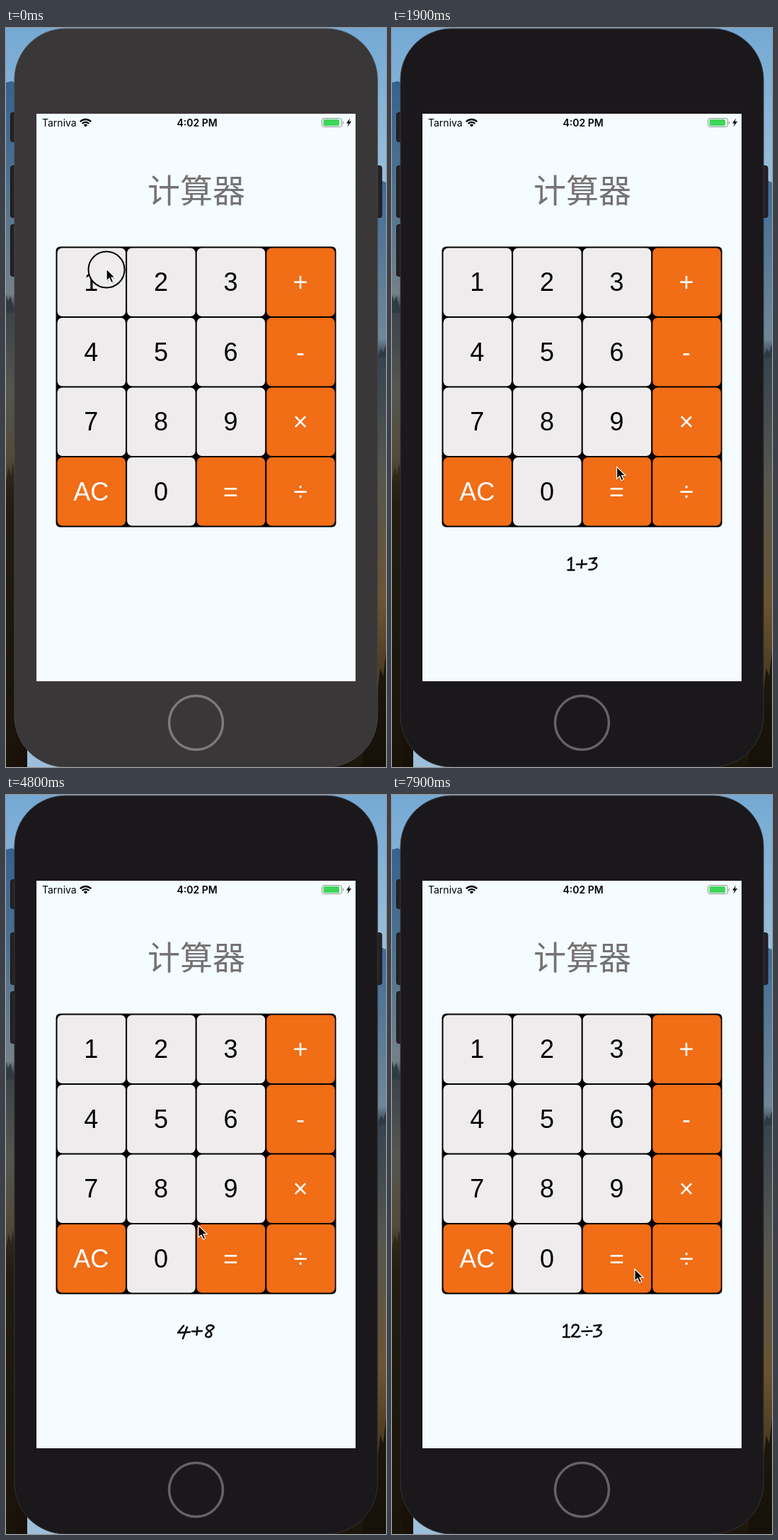
Recreate the animation shown at these times as an HTML page. Size 537 by 1043 pixels, loop 8 s.

```html
<!DOCTYPE html>
<html lang="zh">
<head>
<meta charset="utf-8">
<title>计算器</title>
<style>
  html, body { margin: 0; width: 100%; height: 100%; overflow: hidden; background: #1a181b; }
  svg { display: block; width: 537px; height: 1043px; }
  text { text-anchor: middle; }
  .status { font: 14px Inter, sans-serif; }
  .title { font: 46px "Noto Sans CJK SC", "Noto Sans CJK", sans-serif; fill: #757273; }
  .key { font: 36px "Liberation Sans", Arial, sans-serif; }
  .ink { fill: none; stroke: #0b0b0b; stroke-width: 2.5; stroke-linecap: round; stroke-linejoin: round; }
  .body { fill: #1a181b; stroke: #343235; }
  .button { fill: #242225; stroke: #111012; }
  .home { fill: none; stroke: #656366; stroke-width: 3.5; }
  .idle .body { fill: #3a3738; stroke: #484546; }
  .idle .home { stroke: #7d7a7d; }
</style>
</head>
<body>
<svg id="stage" viewBox="0 0 537 1043">
  <defs>
    <linearGradient id="sky" x2="0" y2="1">
      <stop offset="0" stop-color="#74a9d4"/>
      <stop offset=".22" stop-color="#9dbfda"/>
    </linearGradient>
    <linearGradient id="leftLand" gradientUnits="userSpaceOnUse" x1="0" y1="75" x2="0" y2="1043">
      <stop offset="0" stop-color="#36628f"/>
      <stop offset=".15" stop-color="#4e7290"/>
      <stop offset=".31" stop-color="#748189"/>
      <stop offset=".33" stop-color="#39434a"/>
      <stop offset=".45" stop-color="#55564f"/>
      <stop offset=".55" stop-color="#524a38"/>
      <stop offset=".62" stop-color="#2b2516"/>
      <stop offset="1" stop-color="#181007"/>
    </linearGradient>
    <linearGradient id="rightLand" gradientUnits="userSpaceOnUse" x1="0" y1="215" x2="0" y2="1043">
      <stop offset="0" stop-color="#426c95"/>
      <stop offset=".27" stop-color="#6f8798"/>
      <stop offset=".3" stop-color="#364350"/>
      <stop offset=".5" stop-color="#55574f"/>
      <stop offset=".72" stop-color="#6b5433"/>
      <stop offset=".85" stop-color="#4b3a20"/>
      <stop offset="1" stop-color="#1a140b"/>
    </linearGradient>
  </defs>

  <rect width="537" height="1043" fill="url(#sky)"/>
  <path d="M0 77L8 75 30 86V1043H0z" fill="url(#leftLand)"/>
  <path d="M520 222L530 215 537 218V1043H450V1000H520z" fill="url(#rightLand)"/>
  <path d="M0 376l3 10 3-8 4 14 4 10H0zM537 446l-4 12-3-6-5 14h12z" fill="#303a42"/>
  <path d="M0 640l4-20 3 12 3-18 4 34v395H0z" fill="#1a160c" opacity=".55"/>
  <path d="M537 880l-4 35-4-12-6 50-14 20-6 70h34z" fill="#15110a" opacity=".85"/>

  <g id="phone">
    <g class="button">
      <rect x="6.5" y="119.5" width="12" height="41" rx="3"/>
      <rect x="6.5" y="194.5" width="12" height="73" rx="3"/>
      <rect x="6.5" y="277.5" width="12" height="73" rx="3"/>
      <rect x="519" y="194.5" width="12" height="73" rx="3"/>
    </g>
    <rect class="body" x="12" y="1" width="513" height="1042" rx="72"/>
    <circle class="home" cx="268.5" cy="980.5" r="38"/>
  </g>
  <rect x="43" y="121" width="451" height="801" fill="#f4fcff"/>

  <g class="status">
    <text x="51" y="138.5" style="text-anchor:start">Tarniva</text>
    <text x="270" y="138.5" font-weight="600">4:02 PM</text>
  </g>
  <path d="M104.9 132.3A10.4 10.4 0 0 1 120.1 132.3M107.7 135A6.5 6.5 0 0 1 117.3 135" fill="none" stroke="#000" stroke-width="2.4"/>
  <path d="M112.5 139.5l-2.7-2.6a3.8 3.8 0 0 1 5.4 0z"/>
  <rect x="446.5" y="127.5" width="28" height="12" rx="3" fill="none" stroke="#8a8f91"/>
  <rect x="448.5" y="129" width="22.5" height="9" rx="1.5" fill="#3fd65a"/>
  <path d="M476 131.5q2.5 2 0 4.5z" fill="#8a8f91"/>
  <path d="M486 127.5l-5 7h3l-1.500 5 5.500-7.500h-3.200z"/>

  <text class="title" x="269" y="246">计算器</text>
  <rect x="70.500" y="308.500" width="396" height="396" rx="6"/>
  <g id="keys" class="key"></g>
  <g id="expression" class="ink" role="img"></g>
  <g id="result" class="ink" role="img"></g>

  <g id="pointer">
    <circle id="ring" r="25.500" cy="1" fill="#efecee" stroke="#000" stroke-width="2"/>
    <path d="M1 2V19L5 15 8 21 11 20 8 14 13 14z" opacity=".2"/>
    <path d="M0 0V17L4 13.300 6.800 19.500 9.700 18.200 7 12.200H12.300z" stroke="#fff" stroke-width="1.200"/>
  </g>
</svg>
<script>
const LOOP = 8000, STEP = 100, PRESS = 200;
const $ = id => document.getElementById(id);

// Handwritten characters: advance width and pen strokes above the baseline.
const pen = {
  '1': [12, 'M2-15L6.500-18.500 6-1M1.500-1H10.500'],
  '2': [14, 'M2-14C3-20 12-20 11-14C10-9 5-6 1.500-1.500C5-3 8 0 13-2'],
  '3': [14, 'M2-17L12-18 6-11C16-12 14-1 1.500-1.500'],
  '4': [19, 'M9-17L1-7 18-8M14-15L8 1'],
  '8': [17, 'M14-16C9-20 1-15 6-11C14-7 12 0 6-1C0-2 5-8 9-10C13-12 17-15 13-17'],
  '+': [18, 'M2-9L16-9.500M9.500-15L8.500-4'],
  '=': [17, 'M3-11L16-12M1-6L15-6'],
  '÷': [17, 'M2-9L16-9.500M9-15h.5M8.500-4h.5']
};

// Pointer stops: [time, x, y]
const stops = [
  [200, 142, 340], [600, 414, 350], [700, 414, 350], [1000, 323, 355],
  [1500, 323, 355], [2000, 317, 650], [2400, 317, 650], [3200, 407, 350],
  [3500, 407, 350], [4200, 215, 548], [4500, 215, 548], [5000, 303, 640],
  [5600, 303, 640], [6100, 436, 668], [6600, 436, 668], [7100, 328, 362],
  [7400, 328, 362], [7900, 343, 669]
];

// Clicks: [time, expression afterwards, result afterwards]
const clicks = [
  [0, '1', ''], [600, '1+', ''], [1200, '1+3', ''], [2100, '1+3=', '4'],
  [3200, '4+', ''], [4200, '4+8', ''], [5000, '4+8=', '12'],
  [6100, '12÷', ''], [7100, '12÷3', '']
];

$('keys').innerHTML = [...'123+456-789×', 'AC', ...'0=÷'].map((label, i) => {
  const x = 72.5 + i % 4 * 98.6, y = 310.5 + (i >> 2) * 98.5;
  const isDigit = /\d/.test(label);
  return `<rect x="${x}" y="${y}" width="96.5" height="96.5" rx="7" fill="${isDigit ? '#efecee' : '#f16d16'}"/>
    <text x="${x + 47.8}" y="${y + 60.5}" fill="${isDigit ? '#000' : '#fff'}">${label}</text>`;
}).join('');

function write(id, text, baseline) {
  const group = $(id);
  if (group.getAttribute('aria-label') === text) return;
  let x = 269 - [...text].reduce((sum, c) => sum + pen[c][0], 0) / 2;
  group.setAttribute('aria-label', text);
  group.innerHTML = [...text].map(c => {
    const stroke = `<path transform="translate(${x} ${baseline})" d="${pen[c][1]}"/>`;
    x += pen[c][0];
    return stroke;
  }).join('');
}

function pointerAt(t) {
  const next = stops.findIndex(s => s[0] >= t);
  if (next <= 0) return stops[0].slice(1);
  const [t0, x0, y0] = stops[next - 1], [t1, x1, y1] = stops[next];
  const u = (t - t0) / (t1 - t0), k = u * u * (3 - 2 * u);
  return [x0 + (x1 - x0) * k, y0 + (y1 - y0) * k];
}

function draw(now) {
  const t = Math.floor(now % LOOP / STEP) * STEP;
  const shown = clicks.findLast(c => t >= c[0] + PRESS) || [0, '', ''];
  write('expression', shown[1], 766);
  write('result', shown[2], 838);
  $('phone').classList.toggle('idle', t < STEP);
  $('pointer').setAttribute('transform', `translate(${pointerAt(t)})`);
  $('ring').style.display = clicks.some(c => t >= c[0] && t < c[0] + PRESS) ? '' : 'none';
}

const start = performance.now();
function tick() {
  draw(performance.now() - start);
  requestAnimationFrame(tick);
}
tick();
</script>
</body>
</html>
```
